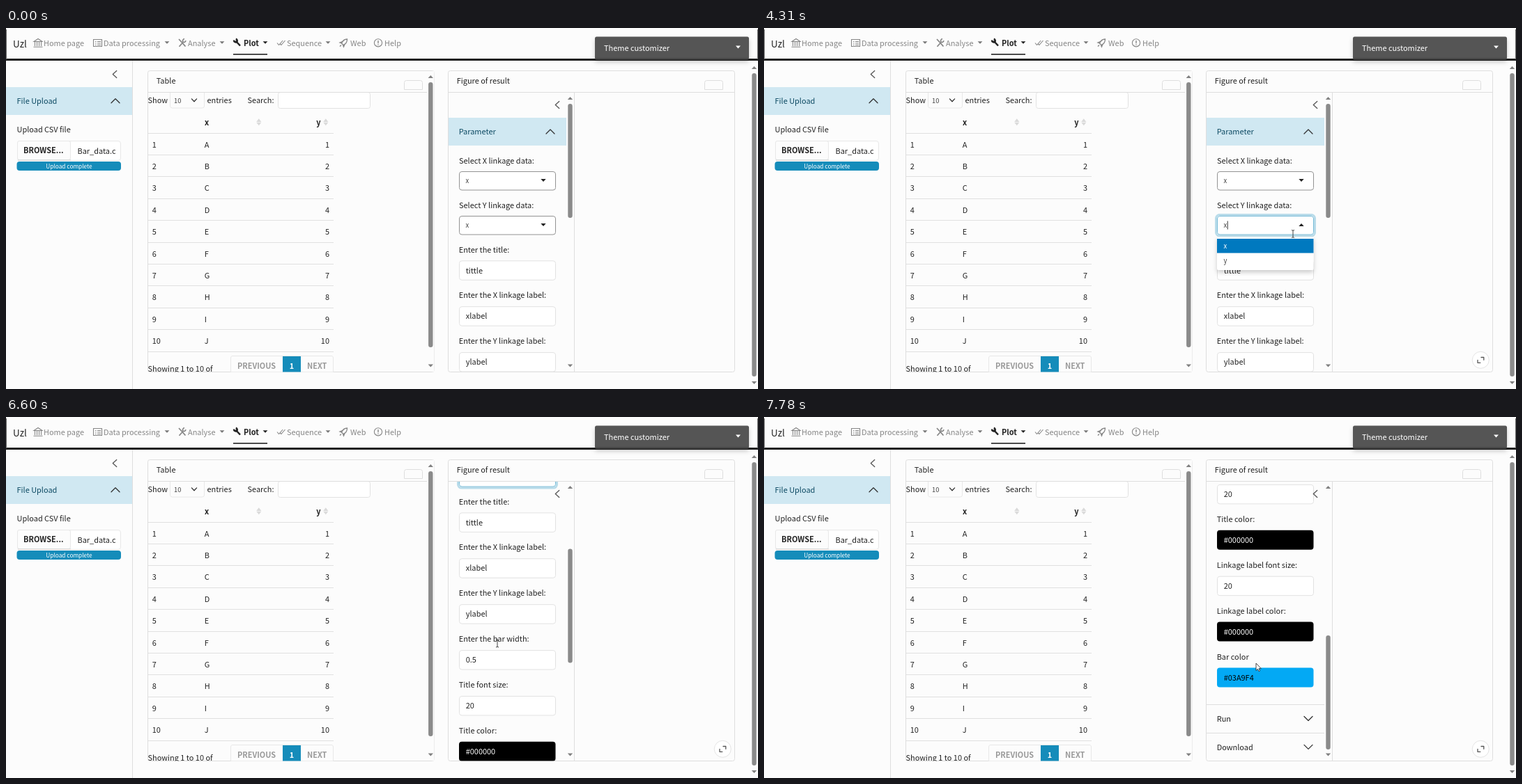
An HTML page for the animation above (8000 ms loop, 1079x519 px).

```html
<!DOCTYPE html>
<html lang="en">
<head>
<meta charset="utf-8">
<title>Plot app</title>
<style>
html, body { margin: 0; width: 100%; height: 100%; overflow: hidden; background: #fcfcfc }
svg { display: block; width: 100vw; height: 100vh }
text { font: 10.95px "Noto Sans CJK SC", "Noto Sans CJK JP", "Noto Sans", sans-serif; fill: #222; white-space: pre }
.b { font-weight: 700 }
.nav { fill: #868686 }
.small { font-size: 9.4px; fill: #444 }
.line { fill: none; stroke: #dedede }
.ink { fill: none; stroke: #333; stroke-width: 1.3; stroke-linecap: round; stroke-linejoin: round }
.icon { fill: none; stroke: #868686; stroke-width: 1.1 }
</style>
</head>
<body>
<svg viewBox="0 0 1079 519" preserveAspectRatio="none">
  <defs>
    <clipPath id="table"><path d="M203 93H604V494.5H203z"/></clipPath>
    <clipPath id="pane"><path d="M635 93H815V494.5H635z"/></clipPath>
    <clipPath id="file"><path d="M94 160H157V192H94z"/></clipPath>
    <filter id="shadow" x="-20%" y="-30%" width="140%" height="180%">
      <feDropShadow dx="0" dy="3.5" stdDeviation="3" flood-opacity=".2"/>
    </filter>
  </defs>
  <g id="still"></g>
  <g id="live"></g>
</svg>
<script>
const LOOP = 8000;
const text = (x, y, s, cls = '', more = '') => `<text x="${x}" y="${y}" class="${cls}" ${more}>${s}</text>`;
const rect = (x, y, w, h, fill, r = 0, more = '') =>
  `<rect x="${x}" y="${y}" width="${w}" height="${h}" rx="${r}" fill="${fill}" ${more}/>`;
const path = (d, cls = 'line', more = '') => `<path d="${d}" class="${cls}" ${more}/>`;
const frame = (x, y, w, h, stroke = '#e2e2e2', r = 3.5, fill = '#fff') =>
  rect(x + .5, y + .5, w - 1, h - 1, fill, r, `stroke="${stroke}"`);
// filled triangle, pointing down when h > 0
const tri = (x, y, w, h, fill) => path(`M${x - w} ${y - h / 2}h${2 * w}l${-w} ${h}z`, '', `fill="${fill}"`);
const chevron = (x, y, w, h) => path(`M${x - w} ${y - h / 2}l${w} ${h}l${w} ${-h}`, 'ink');
const back = (x, y) => path(`M${x + 2.7} ${y - 5}l-5.4 5l5.4 5`, 'ink', 'style="stroke:#555"');
const bar = (x, top, bottom, y, h) =>
  tri(x, top, 3.7, -4, '#808080') + tri(x, bottom, 3.7, 4, '#808080') + rect(x - 3.2, y, 6.4, h, '#8a8a8a', 3.2);

function header() {
  const items = [[54, 'Home page'], [140, 'Data processing', 231], [261, 'Analyse', 310], [341, 'Plot', 372],
    [403, 'Sequence', 462], [494, 'Web'], [543, 'Help']];
  let s = rect(0, 44, 1079, 3, '#1d1d1d') + rect(0, 2, 1, 43, '#666') + rect(1078, 2, 1, 43, '#666');
  s += text(10, 27.5, 'Uzl', '', 'style="font-size:13.4px"');
  for (const [x, label, caret] of items) {
    const on = label === 'Plot';
    s += text(x, 25.5, label, on ? 'b' : 'nav');
    if (caret) s += tri(caret, 21, 3.4, 3.6, on ? '#222' : '#777');
  }
  s += rect(326, 37, 49, 1.6, '#222');
  s += path('M40 19.5L46 15.5L52 19.5zM41.5 20v6M44.5 20v6M47.5 20v6M50.5 20v6M39.5 27.3h13', 'icon');
  s += path('M125.5 16.5h12v10h-12zM128 19.5h1.5M131 19.5h5M128 22h1.5M131 22h5M128 24.5h1.5M131 24.5h5', 'icon');
  s += path('M248 16l9.5 10.5M258 18.2a3 3 0 0 1-4 2.2l-5.5 6.3M256 15.5a3 3 0 0 0-2 4.5', 'icon', 'style="stroke-width:1.7"');
  s += path('M329.5 18.5L336 25.5M327 17.5a3 3 0 0 0 4.2 2.8a3 3 0 0 0-1.4-4.6', 'icon', 'style="stroke:#222;stroke-width:2.5"');
  s += path('M389 21.5l2.6 3l5.6-6.5M393.5 23l1.4 1.5l5.6-6.5', 'icon');
  s += path('M489.5 16c-4 0-6.5 2.5-8 6l2.5 2.5c3.500-1.500 5.500-4.500 5.500-8.500zM482.500 19.500l-3.500 1.500l2.500 1M486 23.500l-1.500 3.500l-1-2.500M479 26.500l2-2', 'icon', 'style="stroke-width:1.3"');
  s += '<circle cx="534" cy="21.3" r="5.6" class="icon"/>' + path('M534 18v4.300M534 23.500v1.300', 'icon', 'style="stroke-width:1.4"');
  s += rect(845, 12.5, 221, 33, '#555', 2.500, 'filter="url(#shadow)"') + rect(846, 43, 219, 2, '#474747');
  return s + text(858, 32.5, 'Theme customizer', '', 'style="fill:#fff"') + tri(1050.500, 27.500, 3.5, 3.8, '#fff');
}

function sidebar() {
  return path('M181.5 47V519') + back(156, 66.5) + rect(0, 85, 181, 40, '#d0e8f2') +
    text(15.5, 109, 'File Upload', '', 'style="fill:#0d4a63"') + chevron(157, 104.8, 6, -6) +
    text(15.5, 150, 'Upload CSV file') +
    frame(16, 162, 149, 29, '#e8e8e8') + frame(16, 162, 77, 28, '#e8e8e8', 2.5, '#fcfcfc') + rect(17, 189, 76, 2, '#e0e0e0') +
    text(25, 180, 'BROWSE...', 'b') + `<g clip-path="url(#file)">${text(102.5, 181, 'Bar_data.csv')}</g>` +
    rect(15.5, 192, 149.5, 13, '#158cba', 4) +
    text(90.5, 201.5, 'Upload complete', '', 'text-anchor="middle" style="fill:#fff;font-size:8.3px"');
}

const card = (x, title) => frame(x, 61, 412, 434, '#dedede', 3, '#fcfcfc') + path(`M${x} 92.5h${x < 300 ? 401 : 412}`) +
  text(x + 12.7, 80, title) + path(`M${x + 368.500} 88.500v-10q0-3 3-3h20q3 0 3 3v10z`);

function table() {
  const sorter = x => tri(x, 132.6, 3.6, -4.6, '#dadada') + tri(x, 138, 3.6, 4.6, '#dadada');
  let s = text(203.5, 107.5, 'Show') + path('M235.500 92v20q0 3 3 3h43q3 0 3-3v-20', 'line', 'style="stroke:#e8e8e8"') +
    text(241, 107.500, '10', 'small') + chevron(270, 103.800, 3.6, 3.8) + text(288.500, 107.500, 'entries') +
    text(346.500, 107.500, 'Search:') + frame(390, 92, 133, 24, '#e2e2e2', 3) +
    text(285, 140, 'x', 'b') + sorter(362.800) + text(451.500, 140, 'y', 'b', 'text-anchor="end"') + sorter(458.800);
  for (let i = 0; i <= 10; i++) {
    const y = 151.500 + 31.400 * i;
    s += rect(203, Math.round(y) - 1, 267, 1, '#e0e0e0');
    if (i < 10) s += text(209.800, y + 20, i + 1) + text(284.700, y + 20, 'ABCDEFGHIJ'[i]) +
      text(464, y + 20, i + 1, '', 'text-anchor="end"');
  }
  s += text(203.500, 493.500, 'Showing 1 to 10 of') + frame(322, 471, 148, 30, '#e8e8e8', 2.500, '#fcfcfc') +
    text(332, 489.500, 'PREVIOUS', 'b', 'style="fill:#999"') + rect(397, 472, 26, 24, '#158cba') +
    text(410, 489.500, '1', 'b', 'text-anchor="middle" style="fill:#fff"') + text(432, 489.500, 'NEXT', 'b', 'style="fill:#999"');
  return card(203, 'Table') + `<g clip-path="url(#table)">${s}</g>` +
    rect(604, 62, 10.500, 432, '#fcfcfc') + bar(609.300, 70, 485.500, 78, 381);
}

still.innerHTML = header() + sidebar() + table() + card(634, 'Figure of result') +
  path('M815.5 93V495') + bar(1073.500, 57, 510, 65, 436);

// --- motion ---
const OPEN_X = 1620, PICK_X = 3320, OPEN_Y = 4170, PICK_Y = 4960;
const within = (t, a, b) => t >= a && t < b;
const ease = p => (p = Math.min(1, Math.max(0, p)), p * p * (3 - 2 * p));

// keys: rows of time and values
function track(keys, t) {
  let i = 1;
  while (i < keys.length - 1 && t > keys[i][0]) i++;
  const a = keys[i - 1], b = keys[i], p = ease((t - a[0]) / (b[0] - a[0]));
  return a.slice(1).map((v, k) => v + (b[k + 1] - v) * p);
}
const SCROLL = [[5697, 0], [5950, 97], [6220, 97], [6480, 193.400], [6540, 193.400], [7070, 290], [7225, 290], [7780, 501]];
const POINTER = [[260, 770, -16], [700, 704, 120], [1070, 742, 213], [1250, 742, 213], [1500, 744, 219], [1650, 744, 219],
  [2050, 718, 264], [2200, 712, 262], [2480, 712, 262], [2810, 712, 262], [3190, 707, 251], [3320, 707, 251],
  [3930, 757, 282], [4080, 757, 282], [4290, 759, 296], [4340, 759, 296], [4680, 688, 329], [5130, 688, 329],
  [5430, 708.500, 326], [6230, 708.500, 326], [6500, 705, 325.500], [6650, 705, 325.500], [7060, 705.500, 353], [7780, 706, 354]];

function select(label, y, value, open, focus, t, since) {
  const caret = open && Math.floor((t - since) / 500) % 2 === 0;
  return text(650, y - 11, label) +
    (focus ? rect(648.500, y - 1.500, 142, 30.500, 'none', 5, 'stroke="#b9dcea" stroke-width="3"') : '') +
    frame(650, y, 139, 27.500, focus ? '#79bcd8' : '#939393') + text(659.500, y + 17, value, 'small') +
    tri(771, y + 13, 3.700, open ? -4 : 4, '#222') + (caret ? rect(664.700, y + 7.500, 1, 12, '#333') : '');
}

function dropdown(y, hoverY) {
  return rect(650, y, 138.500, 48, '#fff', 2, 'filter="url(#shadow)"') + rect(650, y + 3, 138.500, 20.500, '#0079bf') +
    (hoverY ? rect(650, y + 23.500, 138.500, 21, '#f4f4f4') : '') +
    text(659.500, y + 16.500, 'x', 'small', 'style="fill:#fff"') + text(659.500, y + 37.500, 'y', 'small');
}

const FIELDS = [['Enter the title:', 'tittle'], ['Enter the X linkage label:', 'xlabel'], ['Enter the Y linkage label:', 'ylabel'],
  ['Enter the bar width:', '0.5'], ['Title font size:', '20'], ['Title color:', '#000000', '#fff'],
  ['Linkage label font size:', '20'], ['Linkage label color:', '#000000', '#fff'], ['Bar color', '#03A9F4', '#000']];

function form(t, py) {
  const openX = within(t, OPEN_X, PICK_X), openY = within(t, OPEN_Y, PICK_Y);
  let s = rect(635, 129, 169, 40, '#d0e8f2') + text(649.700, 153, 'Parameter', '', 'style="fill:#0d4a63"') + chevron(781, 149, 6, -6);
  s += select('Select X linkage data:', 206, 'x', openX, within(t, OPEN_X, OPEN_Y), t, OPEN_X);
  s += select('Select Y linkage data:', 270, t < PICK_Y ? 'x' : 'y', openY, t >= OPEN_Y, t, OPEN_Y);
  FIELDS.forEach(([label, value, ink], i) => {
    const y = 322.500 + 65.900 * i;
    s += text(649.700, y, label);
    s += ink ? rect(650, y + 11.800, 138.500, 28, value, 4) : frame(650, y + 11.800, 139, 28.500);
    s += text(659.700, y + 30, value, '', ink ? `style="fill:${ink}"` : '');
    if (i === 4 && within(t, 6880, 7290)) s += tri(773, y + 21.500, 2.600, -3, '#555') + tri(773, y + 30, 2.600, 3, '#555');
  });
  ['Run', 'Download'].forEach((label, i) => {
    const y = 914.500 + 40.900 * i;
    s += path(`M635 ${y}h169`) + text(649.700, y + 24.500, label) + chevron(781, y + 20, 6, 6);
  });
  if (openX) s += dropdown(236, py > 259);
  if (openY) s += dropdown(300, py > 324);
  return s;
}

const SHAPES = {
  arrow: ['M0 0V10.500L2.400 8.300L4 11.700L5.600 11L4.100 7.700H7.300z', '#fff'],
  hand: ['M0 1q1-1.500 2 0v5l4 .8q1.500.4 1.300 2l-.7 3.700q-.2 1.800-1.800 1.800h-3q-1 0-1.800-1.200l-2.800-4q0-1.500 1.500-1l1.300 1.100z', '#fff'],
  beam: ['M-2-5.500q2 0 2 1.200q0-1.200 2-1.200M0-4.500v9M-2 5.500q2 0 2-1.200q0 1.200 2 1.200', 'none']
};

function pointer(t, x, y) {
  let kind = 'arrow';
  if (within(t, 5950, 7050)) kind = 'beam';
  else if (within(t, OPEN_X, PICK_X)) kind = y > 238 ? 'hand' : 'beam';
  else if (within(t, OPEN_Y, PICK_Y)) kind = y > 302 ? 'hand' : 'beam';
  else if (t < PICK_Y && (within(y, 206, 234) || within(y, 270, 298))) kind = 'hand';
  const [d, fill] = SHAPES[kind];
  return path(d, '', `fill="${fill}" stroke="#333" stroke-width=".9" stroke-linejoin="round" transform="translate(${x} ${y})"`);
}

const expand = '<circle cx="1028.300" cy="477.300" r="12" fill="#fff" stroke="#e4e4e4"/>' +
  path('M1029 473.500h3.800v3.800M1027.800 481.300h-3.800v-3.800', 'ink', 'style="stroke:#555"');

function draw(t) {
  const [scroll] = track(SCROLL, t), [x, y] = track(POINTER, t);
  live.innerHTML =
    `<g clip-path="url(#pane)"><g transform="translate(0 ${-scroll})">${form(t, y)}</g></g>` +
    back(791, 110.500) + bar(809.500, 101, 485.500, 109 + scroll * .409, 164) +
    (t > 270 && y > 61 ? expand : '') + pointer(t, x, y);
}

const start = performance.now();
(function tick() {
  draw((performance.now() - start) % LOOP);
  requestAnimationFrame(tick);
})();
</script>
</body>
</html>
```
